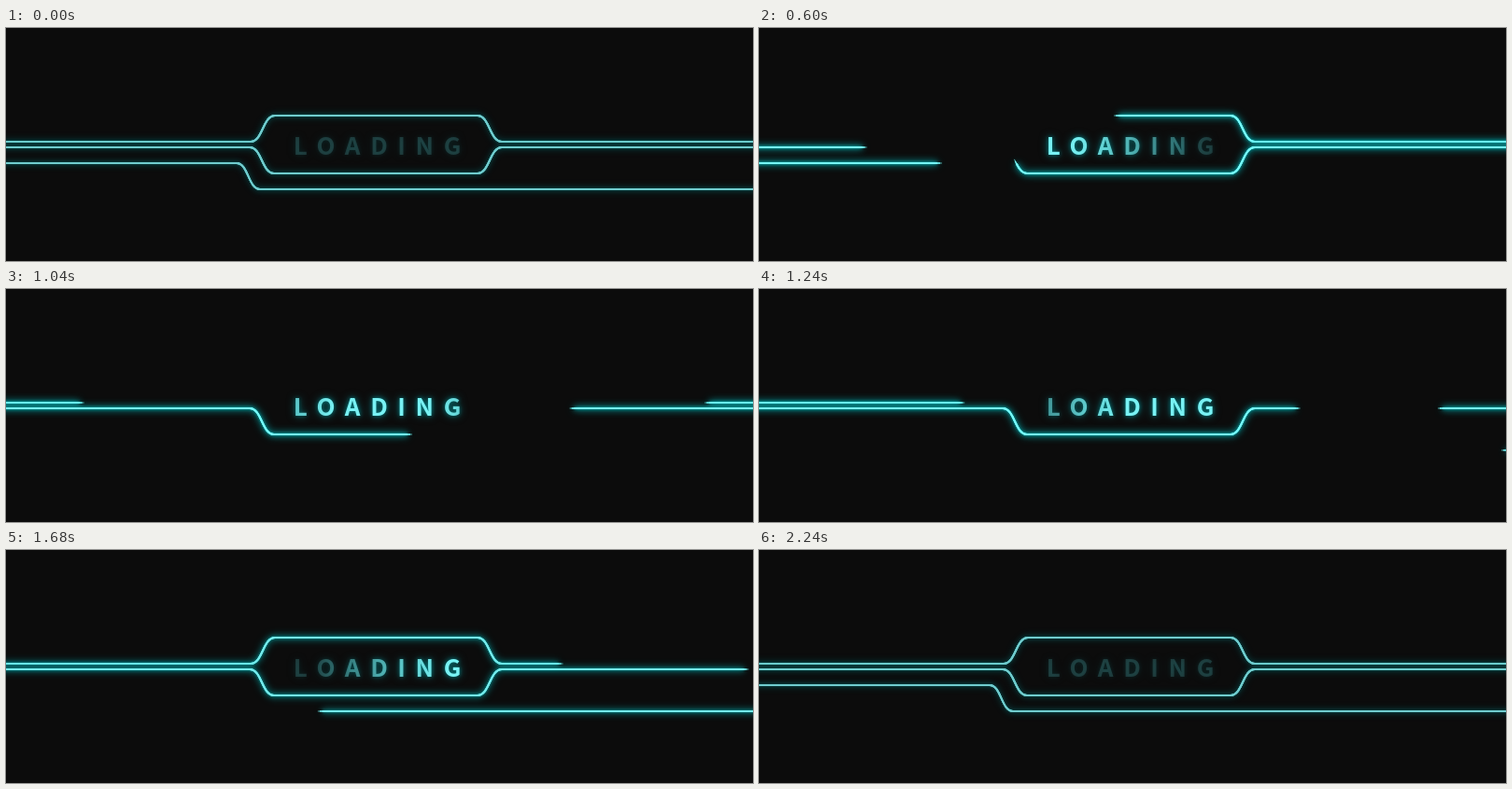
Recreate the animation shown at these times as an HTML page with a canvas. Size 800 by 250 pixels, loop 2400 ms.

```html
<!DOCTYPE html>
<html lang="en">
<head>
<meta charset="utf-8">
<title>Loading</title>
<style>
html, body { margin: 0; width: 100%; height: 100%; overflow: hidden; background: #0c0c0c; }
canvas, svg { position: absolute; left: 0; top: 0; width: 800px; height: 250px; display: block; }
text {
  font: 700 26px "Noto Sans CJK SC", "Noto Sans CJK JP", "Noto Sans CJK", "Noto Sans", sans-serif;
  letter-spacing: 10.65px;
  filter: drop-shadow(0 0 2px rgba(0, 190, 195, .5)) drop-shadow(0 0 4px rgba(0, 190, 195, .5));
}
</style>
</head>
<body>
<canvas id="stage" width="800" height="250"></canvas>
<svg viewBox="0 0 800 250">
  <defs><linearGradient id="shine" gradientUnits="userSpaceOnUse" x1="300" x2="500" y1="0" y2="0"></linearGradient></defs>
  <text x="307.8" y="136" fill="url(#shine)">LOADING</text>
</svg>
<script>
const LOOP = 2400, STEP = 40, PAD = 20, TIP = 5;
const NS = "http://www.w3.org/2000/svg";
const ctx = document.getElementById("stage").getContext("2d");
const shine = document.getElementById("shine");

const clamp = v => Math.min(1, Math.max(0, v));
const mix = (a, b, k) => a + (b - a) * k;

// Cubic ease with flat ends; x1 and x2 are the handle positions.
function ease(p, x1 = 1 / 3, x2 = 2 / 3) {
  if (p <= 0 || p >= 1) return clamp(p);
  let lo = 0, hi = 1, u = 0.5;
  for (let i = 0; i < 24; i++) {
    u = (lo + hi) / 2;
    const v = 1 - u;
    const x = 3 * v * v * u * x1 + 3 * v * u * u * x2 + u * u * u;
    if (x < p) lo = u; else hi = u;
  }
  return u * u * (3 - 2 * u);
}

// Piecewise linear value through [time, value] points.
function track(keys, t) {
  for (let i = 1; i < keys.length; i++) {
    const [t0, v0] = keys[i - 1], [t1, v1] = keys[i];
    if (t <= t1) return mix(v0, v1, clamp((t - t0) / (t1 - t0)));
  }
  return keys[keys.length - 1][1];
}

// tail erases the old line, head draws the new one: [start, duration, ...handles]
function wire(d, tail, head) {
  const el = document.createElementNS(NS, "path");
  el.setAttribute("d", d);
  return { path: new Path2D(d), len: el.getTotalLength(), tail, head };
}

const wires = [
  wire("M-20 122H262c13 0 13 -28 26 -28H505c13 0 13 28 26 28H820",
    [14, 1211], [740, 1332, 0.4, 0.7]),
  wire("M-20 128H261c13 0 13 28 26 28H505c13 0 13 -28 26 -28H820",
    [15, 1500], [248, 1500]),
  wire("M819 173H272c-12.5 0 -12.5 -28 -25 -28H-20",
    [10, 867], [1205, 867])
];

const power = [[0, 0], [600, 1], [1400, 1], [1840, 0.5], [2240, 0]];
const litFront = [[0, 240], [1160, 560]];
const dimFront = [[800, 238], [1240, 320], [1520, 370], [1840, 425], [2240, 570]];

function place(w, [start, time, ...handles], t) {
  const e = ease((t - start) / time, ...handles);
  if (e <= 0) return 0;
  return e >= 1 ? w.len : PAD + e * (w.len - 2 * PAD);
}

function stroke(path, a, b, width) {
  if (b <= a) return;
  ctx.setLineDash([0, a, b - a, 5000]);
  ctx.lineWidth = width;
  ctx.stroke(path);
}

function segment(w, a, b, level) {
  if (b <= a) return;
  const ta = a > 0 ? 1 : 0, tb = b < w.len ? 1 : 0;
  const part = (inset, width) => stroke(w.path, a + inset * ta, b - inset * tb, width);
  const core = [mix(112, 118, level), mix(204, 248, level), mix(206, 248, level)];
  ctx.strokeStyle = `rgb(${core.map(Math.round)})`;
  ctx.shadowColor = `rgba(0,195,198,${mix(0.32, 0.95, level)})`;
  for (const blur of [10, 6, 3]) {
    ctx.shadowBlur = blur;
    part(TIP, 1.8);
  }
  ctx.shadowBlur = 0;
  part(0, 0.7);
  part(2, 1.3);
  part(TIP, 1.8);
}

const stops = Array.from({ length: 21 }, (_, i) => {
  const s = document.createElementNS(NS, "stop");
  s.setAttribute("offset", i / 20);
  s.setAttribute("stop-color", "#78f2f4");
  return shine.appendChild(s);
});

function paintText(t) {
  const on = track(litFront, t), off = track(dimFront, t);
  stops.forEach((s, i) => {
    const x = 300 + i * 10;
    const lit = Math.min(clamp(0.5 + (on - x) / 140), clamp(0.5 + (x - off) / 140));
    s.setAttribute("stop-opacity", mix(0.17, 1, lit).toFixed(3));
  });
}

function draw(t) {
  ctx.fillStyle = "#0c0c0c";
  ctx.shadowBlur = 0;
  ctx.fillRect(0, 0, 800, 250);
  const level = track(power, t);
  for (const w of wires) {
    segment(w, 0, place(w, w.head, t), level);
    segment(w, place(w, w.tail, t), w.len, level);
  }
  paintText(t);
}

const begin = performance.now();
function tick() {
  const t = Math.max(0, performance.now() - begin) % LOOP;
  draw(Math.floor(t / STEP) * STEP);
  requestAnimationFrame(tick);
}
tick();
</script>
</body>
</html>
```
